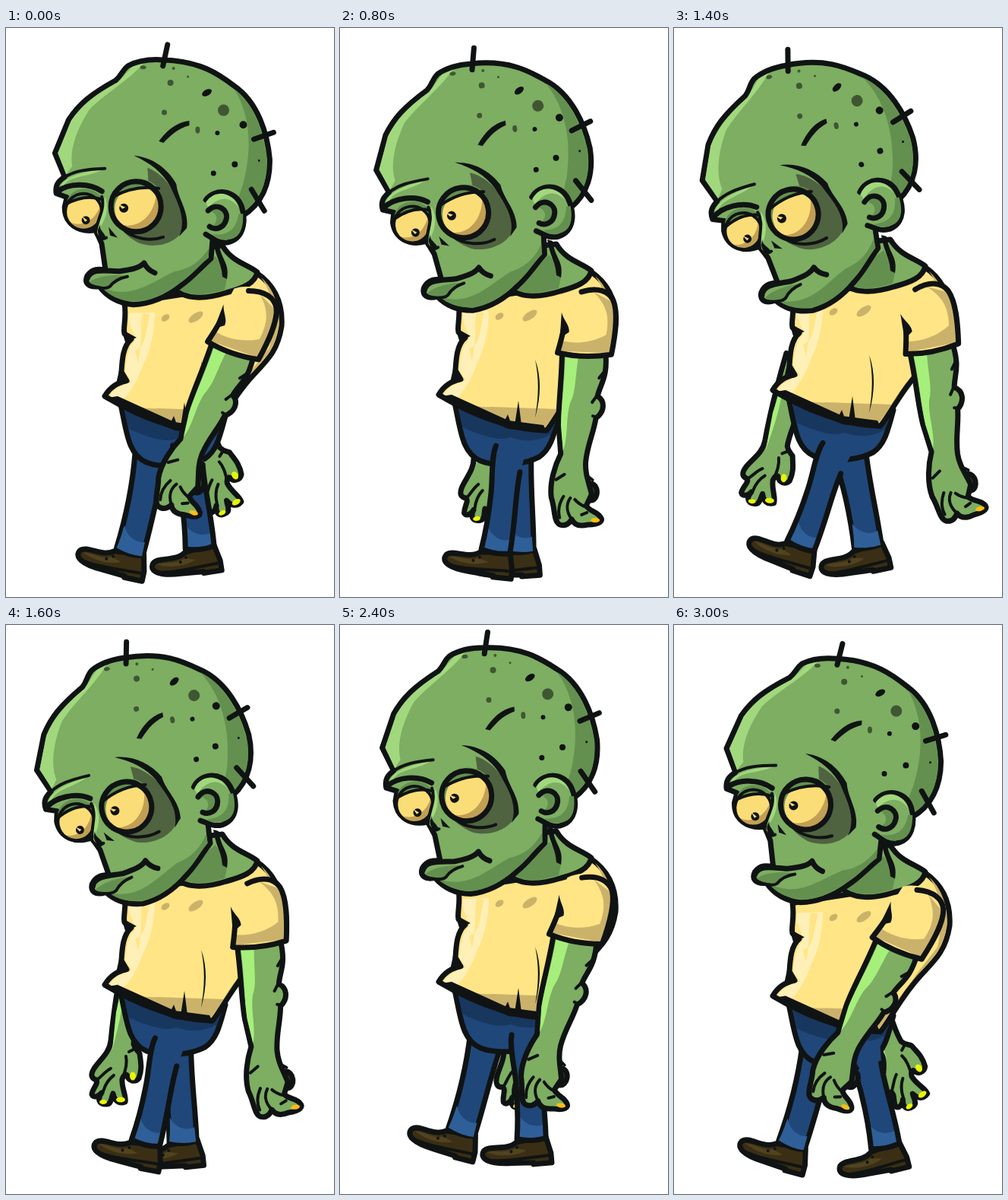
These frames come from a looping animation (432x748 px, 3.2 s). An HTML page:

```html
<!DOCTYPE html>
<html lang="en">
<head>
<meta charset="utf-8">
<title>Walking zombie</title>
<style>
html, body { margin: 0; width: 100%; height: 100%; overflow: hidden; background: #fff; }
svg { display: block; width: 432px; height: 748px; }
path, circle, ellipse { stroke-linejoin: round; stroke-linecap: round; }
.line { fill: none; stroke: #101313; stroke-width: 7; }
.thin { fill: none; stroke: #101313; stroke-width: 4; }
.ink { fill: #101313; }
.out { stroke: #101313; stroke-width: 7; }
.skin { fill: #7dae62; }
.shade { fill: #63904f; }
.glow { fill: #a2d87d; }
.lime { fill: #a6ef7b; }
.moss { fill: #3f5633; }
.shirt { fill: #ffe585; }
.pale { fill: #fff0b8; }
.sand { fill: #cbb26b; }
.blue { fill: #20477a; }
.navy { fill: #18375f; }
.sky { fill: #2f5f98; }
.shoe { fill: #3a2f14; }
.eye { fill: #fadd77; }
.nail { fill: #e9f500; }
</style>
</head>
<body>
<svg viewBox="0 0 432 748">
<defs>
  <g id="foot">
    <path class="shoe out" d="M-20 4C-34 15-56 4-64 12C-71 22-58 30-30 31L0 33V35H24V22L19 0Z"/>
    <path fill="#51431f" d="M-60 14C-48 12-34 18-22 12L-8 16C-26 24-48 20-60 14Z"/>
    <path class="thin" d="M-62 24C-40 29-14 26 22 25"/>
    <circle class="ink" cx="-28" cy="16" r="2"/>
    <circle class="ink" cx="-20" cy="11" r="2"/>
  </g>
  <g id="cuff">
    <path class="sky" d="M-18-1C-15-14-15-24-14-32C-8-18 6-12 17-16V3Q0 5-18-1Z"/>
  </g>
</defs>

<g id="farArm">
  <path class="skin out" d="M156 440C145 495 141 525 138 558C136 574 124 582 116 594C111 602 112 607 119 609
    C122 614 114 620 113 628C115 633 122 631 126 626C120 634 122 641 132 641C139 641 138 634 141 627
    C143 637 149 641 157 638C159 630 152 620 153 608C155 602 159 600 160 604C161 610 170 613 175 607
    C180 594 177 584 176 574C173 570 170 569 168 562C170 535 184 510 192 470Z"/>
  <path class="lime" d="M154 480L145 520L140 570C146 545 154 520 156 480Z"/>
  <path class="thin" d="M121 608C128 602 132 597 138 594M128 624C131 614 135 608 142 603M154 607C157 596 160 588 158 578M162 572L170 568"/>
  <ellipse class="nail" cx="167" cy="604" rx="4" ry="5.500"/>
  <ellipse class="nail" cx="151" cy="635" rx="6" ry="3.500"/>
  <ellipse class="nail" cx="128" cy="638" rx="5" ry="3"/>
</g>

<g id="farLeg">
  <use href="#foot"/>
  <path class="blue out" d="M-18 0C-14-45-15-90-20-128L24-128C19-80 21-40 18 2Q0 6-18 0Z"/>
  <use href="#cuff"/>
</g>

<g id="pelvis">
  <path class="blue out" d="M151 495C159 530 160 560 185 571C205 579 240 577 262 566C277 556 281 540 289 510Z"/>
  <path class="navy" d="M155 500L162 527C190 540 212 545 224 540C245 547 262 545 278 536L286 515Z"/>
</g>

<g id="nearLeg">
  <use href="#foot"/>
  <path class="blue" d="M-19 0C-14-45-13-90-18-118L-14-137Q6-146 26-132L21-104C19-80 22-40 19 2Q0 6-19 0Z"/>
  <use href="#cuff"/>
  <path class="line" d="M-14-137C-19-120-13-90-14-70C-14-45-16-20-19 0Q0 6 19 2C22-40 18-75 21-106"/>
</g>

<g id="torso">
  <path class="shirt out" stroke-width="8" d="M156 362C159 380 154 394 156 402L165 409C154 418 153 436 152 452L159 464
    C146 466 136 474 130 484Q176 512 223 524Q250 531 272 531C284 517 298 486 325 457C345 436 358 424 363 392
    C365 360 352 337 330 322Q290 340 240 349Z"/>
  <path class="sand" d="M336 328C352 350 356 380 347 420L322 452C310 468 296 490 287 503L200 500C180 502 160 494 145 490
    Q180 510 222 520Q250 527 270 527C286 506 300 480 322 455C344 432 355 420 359 392C361 365 352 342 336 328Z"/>
  <path class="pale" d="M162 375C160 395 172 402 170 411C159 422 159 440 157 452L166 465C150 470 140 476 137 484L152 490
    C164 480 174 462 180 444C190 425 196 400 196 374Z"/>
  <path class="shirt" d="M180 375L190 376C184 395 186 410 176 421C180 405 176 392 180 375ZM170 424L177 420L174 440Z"/>
  <path class="ink" d="M152 396L172 407L157 413ZM149 450L162 462L145 468ZM147 484L128 487L152 500L222 529L273 535L268 524L222 518Z"/>
  <path class="ink" d="M257 438C266 462 264 490 257 514C261 490 263 466 257 438ZM235 492L239 524H230ZM221 510L226 524H214Z"/>
  <ellipse class="sand" cx="210" cy="381" rx="6" ry="4" transform="rotate(-35 210 381)"/>
  <ellipse class="sand" cx="250" cy="380" rx="11" ry="5" transform="rotate(-35 250 380)"/>
  <path class="skin out" d="M218 340C235 359 265 356 290 348C312 342 328 336 331 321C317 310 298 308 285 286L250 290Z"/>
  <path class="shade" d="M225 342C245 355 268 350 288 344L292 325L276 300Z"/>
  <path class="ink" d="M273 280C277 305 284 308 285 327L291 330C295 308 283 305 280 282Z"/>
</g>

<g id="head">
  <path class="skin out" d="M160 50C175 42 190 41 206 42C255 43 280 61 300 76C332 98 344 140 347 172C348 205 336 232 311 247
    L272 278L270 303C255 316 246 328 230 339C206 358 186 363 168 364C146 362 132 352 123 340C108 342 103 335 107 326
    C114 316 122 317 131 318L126 284L118 266C96 270 77 258 77 236L80 223L66 218C64 206 70 201 77 196L64 165L82 121
    C96 100 110 88 144 69C152 62 152 56 160 50Z"/>
  <path class="glow" d="M68 165L85 123C98 104 116 88 146 72L166 51L180 47C160 70 128 88 109 108C93 133 83 160 87 182L79 193Z"/>
  <path class="shade" d="M300 80C322 115 324 160 312 205L305 225L312 242C334 228 344 205 343 172C340 140 326 98 300 80Z"/>
  <path class="shade" d="M126 341C165 358 190 335 222 320C244 316 256 306 267 290V302C252 314 244 326 228 336C205 354 185 360 168 360C148 358 136 352 126 341Z"/>
  <path class="glow" d="M70 212C74 196 98 190 128 186C112 195 88 195 80 203Z"/>
  <path class="thin" d="M76 197C90 188 105 186 130 185"/>

  <path fill="#4f6340" d="M186 184C212 192 238 235 235 262C226 283 198 291 175 283C155 272 148 262 143 250L190 240Z"/>
  <path class="ink" d="M168 168C192 170 212 184 224 205C226 225 241 240 238 263L228 274C238 250 226 230 216 208C206 190 190 178 168 168Z"/>
  <path class="line" d="M68 215C82 205 108 203 126 215" stroke-width="6"/>
  <circle class="eye" cx="102" cy="242" r="24"/>
  <path fill="#c19f54" d="M80 252C88 262 114 262 124 234C128 252 118 266 102 266C91 266 84 261 80 252Z"/>
  <path class="shade" d="M80 232C80 210 114 204 126 224Q102 219 80 232Z"/>
  <circle class="thin" cx="102" cy="242" r="24"/>
  <path class="thin" d="M79 232Q104 218 127 226"/>
  <circle class="ink" cx="105" cy="253" r="5.500"/>
  <path class="eye" d="M100 248L107 253L104 255Z"/>

  <circle class="shade" cx="171" cy="234" r="34"/>
  <circle class="eye" cx="173" cy="238" r="30"/>
  <path fill="#c19f54" d="M150 258C172 266 196 248 198 216C209 242 194 267 174 268C164 268 156 264 150 258Z"/>
  <path class="shade" d="M140 222C146 196 186 190 200 211Q170 207 140 222Z"/>
  <circle class="line" cx="171" cy="235" r="33" stroke-width="5"/>
  <path class="thin" d="M141 222Q170 206 201 211"/>
  <path class="thin" d="M154 264C165 277 190 281 207 275"/>
  <circle class="ink" cx="155" cy="237" r="6"/>
  <path class="eye" d="M148 232L157 236L153 238Z"/>

  <path class="glow" d="M130 222C128 240 118 255 120 272L128 276L124 262C132 250 136 236 130 222Z"/>
  <path class="thin" d="M126 222C131 240 119 252 118 270C122 279 128 278 132 276"/>
  <path class="ink" d="M124 258C122 266 130 269 132 277C124 278 120 272 121 265ZM135 262L147 276L137 273Z"/>
  <path class="shade" d="M110 334C122 326 142 324 158 326C148 332 139 336 136 340C126 341 114 340 110 334Z"/>
  <path class="line" d="M107 330C112 315 132 320 150 320C164 318 176 316 182 309Q186 318 196 322" stroke-width="5"/>
  <path class="thin" d="M110 338C120 342 132 344 137 340C143 332 150 329 160 327"/>

  <path class="skin out" d="M263 226C275 210 302 212 310 234C317 256 312 278 291 282C277 283 271 275 263 271"/>
  <path class="glow" d="M263 229C275 211 299 215 306 236C294 218 277 224 266 236Z"/>
  <path class="shade" d="M312 244C313 265 307 278 290 278C280 278 276 275 272 271C294 274 304 262 306 244Z"/>
  <path class="shade" d="M268 240C285 231 293 246 287 257C283 265 276 265 270 261C280 256 280 244 268 240Z"/>
  <path class="line" d="M266 240C278 228 293 239 290 251C287 264 275 266 268 261" stroke-width="5"/>

  <path class="ink" d="M201 149C209 138 222 124 241 122L241 128C224 133 215 143 207 151Z"/>
  <path class="line" d="M206 50L212 22M326 146L352 137M323 212L340 240"/>
  <g class="moss">
    <circle cx="216" cy="72" r="4"/><circle cx="208" cy="111" r="3.500"/><circle cx="286" cy="108" r="7.500"/>
    <circle cx="239" cy="64" r="1.500"/><circle cx="220" cy="53" r="2"/>
    <ellipse cx="180" cy="52" rx="4" ry="2.500"/><ellipse cx="252" cy="134" rx="3" ry="4.500"/>
  </g>
  <g class="ink">
    <ellipse cx="264" cy="85" rx="7" ry="4" transform="rotate(-30 264 85)"/>
    <circle cx="312" cy="127" r="5"/><circle cx="278" cy="138" r="3"/><circle cx="273" cy="191" r="3.500"/>
    <circle cx="301" cy="179" r="4"/><circle cx="333" cy="174" r="1.500"/>
  </g>
</g>

<g id="nearArm">
  <ellipse class="moss out" cx="332" cy="612" rx="8" ry="11"/>
  <path class="skin out" d="M293 425C293 465 288 500 289 525L292 562C285 576 277 600 280 620C285 634 283 651 291 655
    C299 658 304 653 307 648C311 657 320 657 328 655C344 655 349 650 345 645C340 637 331 638 326 630L333 615
    C329 598 324 588 325 572C327 550 335 535 338 515C350 506 350 492 340 486C344 468 354 462 350 425Z"/>
  <path class="lime" d="M297 432H315C310 460 312 480 304 495C298 515 302 540 295 558L292 525C292 500 297 465 297 432Z"/>
  <path class="thin" d="M338 487L333 494M340 514L334 512M350 452L342 462M286 596L297 589M326 590L334 596
    M291 646C288 635 291 626 296 618M307 648C299 637 300 627 305 620M326 632Q316 628 311 622M320 642L327 639"/>
  <ellipse fill="#ffbd12" cx="338" cy="649" rx="6" ry="3"/>
  <path class="shirt" d="M299 352C318 338 350 338 360 360C367 377 363 405 358 431Q320 437 287 429C291 415 293 400 294 380Z"/>
  <path class="sand" d="M289 427L357 429C363 400 363 378 357 361L334 349C350 365 356 380 351 405C332 416 308 418 292 413Z"/>
  <path class="line" d="M318 349C340 342 354 348 360 360C367 377 363 405 358 431Q320 437 287 429C291 415 293 408 295 396"/>
  <path class="ink" d="M292 376C295 387 303 393 302 402L290 410Z"/>
</g>
</svg>
<script>
const LOOP = 3200, STEP = 200;
const parts = Object.fromEntries([...document.querySelectorAll('svg > g')].map(g => [g.id, g]));
const bob = [0, -3, -3, -4, -2, 1, -1, -8, -11, -14, -13, -15, -15, -14, -15, 3.5];

// Ankle keys: time, x, y, tilt
const nearKeys = [
  [0, 255, 682, -9], [400, 232, 687, -2], [800, 205, 687, 6], [1200, 177, 683, 16], [1400, 167, 680, 18],
  [1600, 184, 680, 11], [2000, 212, 682, 1], [2400, 252, 674, -5], [2800, 272, 668, -11], [3000, 278, 684, -14], [3200, 255, 682, -9]];
const farKeys = [
  [0, 163, 688, 12], [400, 203, 690, 3], [800, 237, 686, -4], [1200, 252, 686, -10], [1400, 255, 680, -12],
  [1600, 233, 678, -6], [2000, 195, 680, 8], [2400, 160, 666, 14], [2800, 150, 664, 16], [3000, 155, 683, 15], [3200, 163, 688, 12]];

function sample(keys, t) {
  const i = keys.findIndex(k => k[0] > t), a = keys[i - 1], b = keys[i];
  const u = (t - a[0]) / (b[0] - a[0]);
  return a.map((v, j) => v + (b[j] - v) * u);
}

const move = (id, value) => parts[id].setAttribute('transform', value);

function placeLeg(id, keys, t) {
  const [, x, y, tilt] = sample(keys, t);
  move(id, `translate(${x} ${y}) rotate(${tilt})`);
}

function draw(now) {
  const step = Math.floor(now % LOOP / STEP), t = step * STEP;
  // Linear swing: 0 at 1400 ms, 1 at 3000 ms
  const swing = Math.abs((t + 200) % LOOP - 1600) / 1600;
  const lift = `translate(0 ${bob[step]})`;
  move('torso', lift);
  move('pelvis', lift);
  move('head', `${lift} rotate(${-12.8 + 14.8 * swing} 244 306)`);
  move('nearArm', `${lift} rotate(${-12.7 + 34.8 * swing} 330 352)`);
  move('farArm', `${lift} rotate(${5 - 40 * swing} 205 345)`);
  placeLeg('nearLeg', nearKeys, t);
  placeLeg('farLeg', farKeys, t);
}

const start = performance.now();
function tick() {
  draw(performance.now() - start);
  requestAnimationFrame(tick);
}
tick();
</script>
</body>
</html>
```
